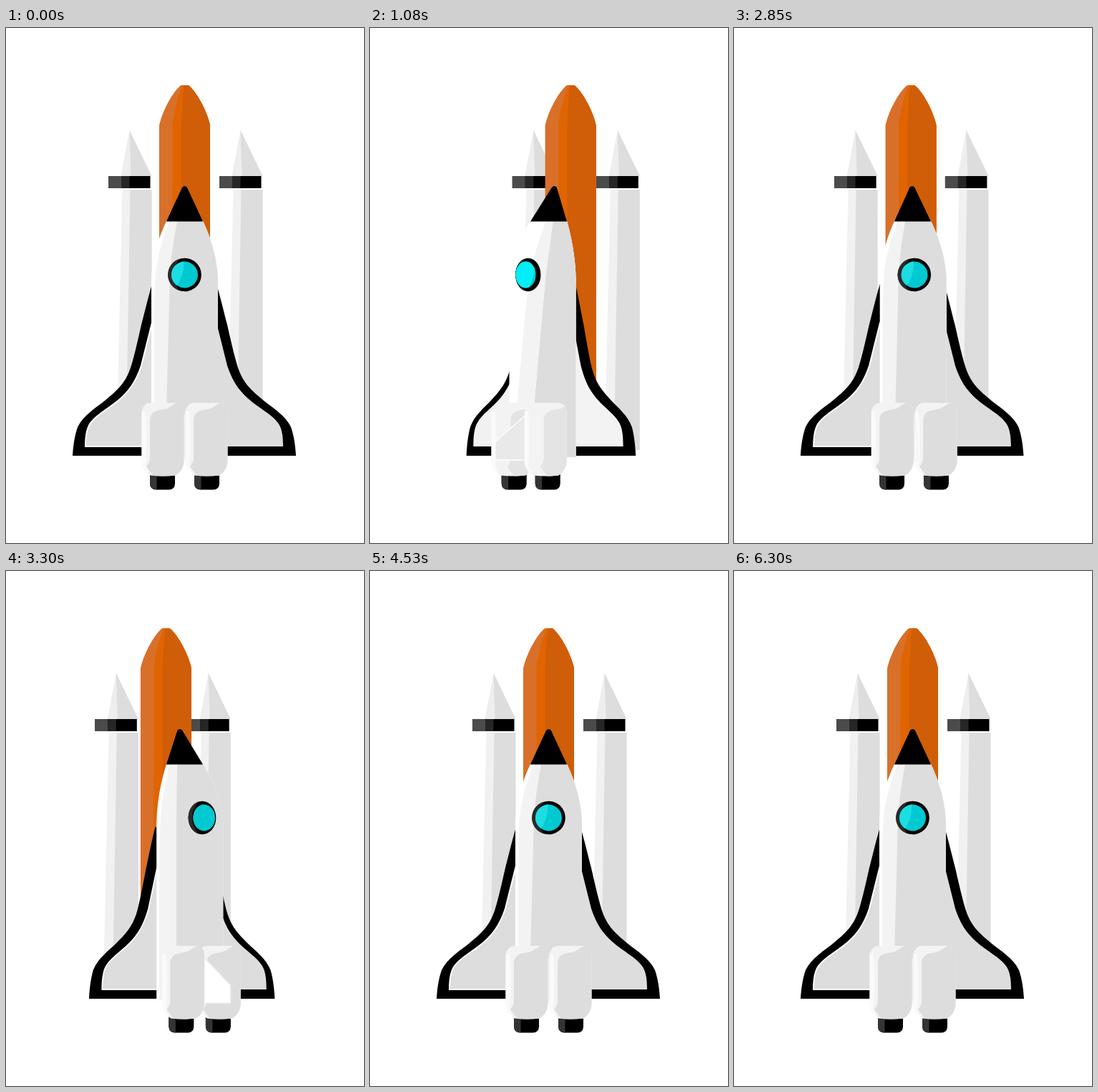
Write an HTML page that moves like this. It is 500 px wide and 720 px high and loops after 6330 ms.

```html
<!DOCTYPE html>
<html lang="en">
<head>
<meta charset="utf-8">
<title>Space shuttle</title>
<style>
  html, body { margin: 0; width: 100%; height: 100%; overflow: hidden; background: #fff; }
  svg { display: block; width: 500px; height: 720px; }
</style>
</head>
<body>
<svg id="stage" viewBox="0 0 500 720" xmlns="http://www.w3.org/2000/svg">
  <defs>
    <g id="booster">
      <path d="M0 143L31 207H-31Z" fill="#fff"/>
      <path d="M0 143L31 207H-12Z" fill="#eee"/>
      <path d="M0 143L31 207H2Z" fill="#ddd"/>
      <path d="M-29.5 226H31V590H-29.5Z" fill="#fff"/>
      <path d="M-10 226H31V590H-18L-14 400Z" fill="#f1f1f1"/>
      <path d="M1 226H31V590H-5Z" fill="#ddd"/>
      <path d="M-29.5 207H29V224H-29.5Z"/>
      <path d="M-29.5 207H-11.5V224H-29.5Z" fill="#4b4b4b"/>
      <path d="M-11.5 207H0V224H-11.5Z" fill="#262626"/>
    </g>
    <path id="wingEdge" d="M0 358H45C52 382 56 400 60 415C64 432 69 456 75 475C82 496 93 506 111 521C123 531 141 541 149 558C153 570 155 582 156 598H0Z"/>
    <path id="wingPanel" d="M0 412H45C50 432 55 452 60 472C68 496 78 508 89 518C106 533 121 539 130 551C136 558 138 569 138 585H0Z"/>
    <path id="podShape" d="M-29.5 536Q-27 524 -16 524H17Q29.5 525 29.5 537V607Q28 619 18 625.500Q0 627.500 -17 625.500Q-28 619 -29.5 607Z"/>
    <clipPath id="podClip"><use href="#podShape"/></clipPath>
    <clipPath id="glassClip"><circle cy="345" r="18.500"/></clipPath>
  </defs>
  <use id="boosterL" href="#booster"/>
  <use id="boosterR" href="#booster"/>
  <g id="tank"></g>
  <g id="wings">
    <use href="#wingEdge"/>
    <use href="#wingEdge" transform="scale(-1 1)"/>
  </g>
  <g id="panels">
    <use id="panelR" href="#wingPanel"/>
    <use id="panelL" href="#wingPanel" transform="scale(-1 1)"/>
  </g>
  <path id="bodyBase" fill="#fff"/>
  <path id="bodyLight" fill="#f3f3f3"/>
  <path id="bodyDark" fill="#ddd"/>
  <path id="nose"/>
  <g id="windowRim">
    <circle cy="345" r="23.300" fill="#000"/>
    <path d="M-6 322.500A23.300 23.300 0 0 0 -6 367.500Q-28 345 -6 322.500Z" fill="#2a2a2a"/>
  </g>
  <g id="windowGlass">
    <circle cy="345" r="18.500" fill="#00c9d1"/>
    <path id="glint" clip-path="url(#glassClip)"/>
  </g>
  <g id="nozzles"></g>
  <g id="rear">
    <g id="podL"></g>
    <path id="fin" stroke-width="1.500"/>
    <g id="podR"></g>
  </g>
</svg>
<script>
const LOOP = 6330, STEP = 30, SWING = 1800, MAX_TURN = 45;
const CX = 249.5;
const $ = id => document.getElementById(id);
const set = (id, name, value) => $(id).setAttribute(name, value);
const mix = (a, b, f) => a + (b - a) * f;

// Cylinder slice of the tank, from fraction u of its radius to the right edge
function tankSlice(u, fill) {
  const x = r => (r * u).toFixed(1);
  return `<path fill="${fill}" d="M${x(5)} 80C${x(14)} 86 ${x(30.5)} 113 ${x(35.5)} 136V575
    H35.500V136C30.500 113 14 86 5 80Z"/>`;
}
$('tank').innerHTML = tankSlice(-1, '#d8702a') + tankSlice(-.48, '#e06400') + tankSlice(-.13, '#d05d08');

const nozzle = id => `<g id="${id}"><path d="M-17.500 622H17.500V637Q17 645.500 9 645.500H-9Q-17 645.500 -17.500 637Z"/>
  <path d="M-17.500 622H-8V645.500Q-17 645 -17.500 637Z" fill="#343434"/></g>`;
$('nozzles').innerHTML = nozzle('nozzleL') + nozzle('nozzleR');

for (const id of ['podL', 'podR'])
  $(id).innerHTML = `<use href="#podShape" fill="#f3f3f3"/>
    <path d="M-30 536H-24Q-21 575 -24 612L-18 627H-30Z" fill="#fafafa" clip-path="url(#podClip)"/>
    <g clip-path="url(#podClip)"><path class="shade"
      d="M-18 546Q-16 537 -8 535L6 532L19 524H75V628H-12L-23 613Q-18 608 -18 600Z"/></g>`;

// Fuselage cross-section at height y
function section(y) {
  const p = Math.min(1, (y - 270) / 85);
  const e = 1 - Math.pow(1 - p, 1.9);
  return { r: 25.5 + 21 * e, z: 13 * e };
}

function bodyPath(sin, leftAt) {
  const left = [], right = [];
  for (let y = 270; y <= 600; y += 5) {
    const { r, z } = section(y), x = CX - z * sin;
    left.push(`${(x + r * leftAt((y - 270) / 254)).toFixed(1)} ${y}`);
    right.unshift(`${(x + r).toFixed(1)} ${y}`);
  }
  return 'M' + left.concat(right).join('L') + 'Z';
}

function turnAt(t) {
  const swing = start => {
    const p = (t - start) / SWING;
    return p > 0 && p < 1 ? MAX_TURN * (1 - Math.cos(2 * Math.PI * p)) / 2 : 0;
  };
  return swing(0) - swing(2700);
}

function draw(t) {
  const deg = turnAt(t), a = deg * Math.PI / 180;
  const sin = Math.sin(a), cos = Math.cos(a);
  const lit = Math.pow(Math.max(0, sin) / .5556, 1.6);
  const px = (x, z) => CX + x * cos - z * sin;
  const round = (id, x, z) => set(id, 'transform', `translate(${px(x, z).toFixed(2)} 0)`);
  const flat = (id, z, shift = 0) =>
    set(id, 'transform', `matrix(${cos} 0 0 1 ${px(0, z) + shift} 0)`);

  round('boosterL', -77, -57);
  round('boosterR', 78, -57);
  round('tank', 0, -47);
  flat('wings', -6, -.5);
  flat('panels', 0, -.5);
  set('panelL', 'fill', deg > 7 ? '#f1f1f1' : '#ddd');
  set('panelR', 'fill', deg > 20 ? '#f3f3f3' : '#ddd');
  set('panelL', 'stroke', deg > 7 ? 'none' : '#fff');
  set('panelL', 'stroke-width', 2);

  set('bodyBase', 'd', bodyPath(sin, () => -1));
  set('bodyLight', 'd', bodyPath(sin, f =>
    Math.max(-1, mix(-.82, -.92, Math.min(1, f * 2)) + lit * mix(.5, .12, Math.min(1, f)))));
  set('bodyDark', 'd', bodyPath(sin, f =>
    Math.min(.95, mix(-.4, -.54, f) + Math.max(0, -sin) * .25 * f + lit * mix(.5, .23, f))));

  const tip = px(0, -12);
  set('nose', 'd', `M${CX - 25.5} 270.5L${tip - 3.5} 223Q${tip} 219 ${tip + 3.5} 223L${CX + 25.5} 270.5Z`);

  flat('windowRim', 44);
  flat('windowGlass', 49);
  const edge = -5 + 14 * lit;
  set('glint', 'd', `M-20 325H${edge + 4}Q${edge + 5} 348 ${edge - 9} 365H-20Z`);
  set('glint', 'fill', deg > 20 ? '#00eef5' : deg > -8 ? '#1bdde2' : '#00c9d1');

  round('nozzleL', -31, 38);
  round('nozzleR', 31, 38);
  round('podL', -30.5, 42);
  round('podR', 30.5, 42);
  for (const shade of document.querySelectorAll('.shade')) {
    shade.setAttribute('transform', `translate(${Math.min(26, lit * 12)} 0)`);
    shade.setAttribute('fill', deg > 20 ? '#e4e4e4' : '#ddd');
  }

  // Tail fin stands between the two pods, pointing at the viewer
  const near = px(0, 49), far = px(0, 115);
  set('fin', 'd', `M${near} 541L${far} 579V604H${near}Z`);
  set('fin', 'fill', deg > 0 ? '#e9e9e9' : '#fff');
  set('fin', 'stroke', deg > 0 ? '#fff' : '#f1f1f1');
  const order = deg < 0 ? ['podR', 'fin', 'podL'] : ['podL', 'fin', 'podR'];
  if ($('rear').lastElementChild.id !== order[2]) order.forEach(id => $('rear').append($(id)));
}

const start = performance.now();
function tick() {
  const t = (performance.now() - start) % LOOP;
  draw(Math.floor(t / STEP) * STEP);
  requestAnimationFrame(tick);
}
tick();
</script>
</body>
</html>
```
